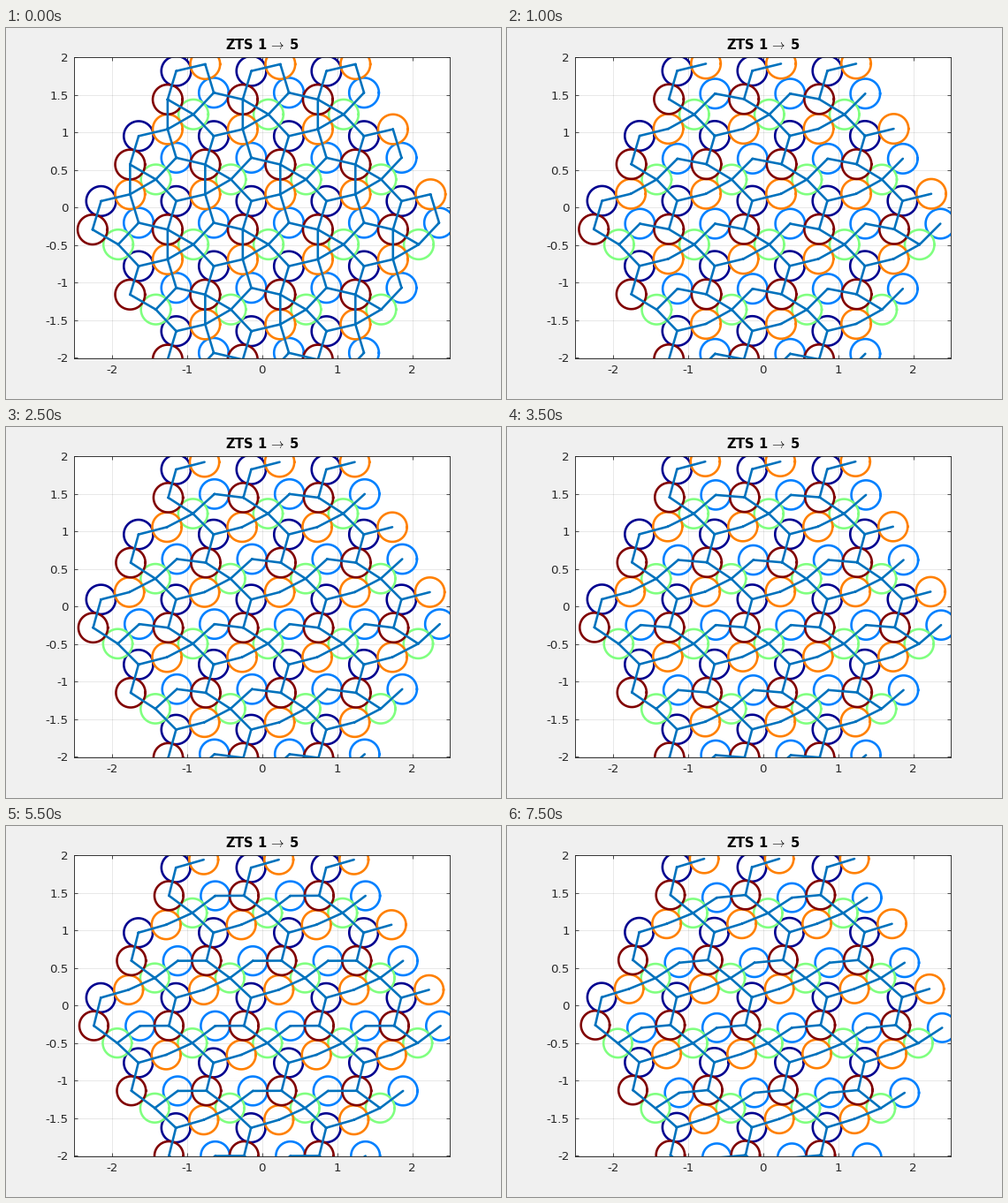
Recreate the animation shown at these times as a matplotlib script. Size 560 by 420 pixels, loop 8 s.

```python
import numpy as np
import matplotlib.pyplot as plt
from matplotlib.animation import FuncAnimation

FRAMES, INTERVAL = 16, 500
W, H, DPI = 560, 420, 100
LEFT, RIGHT, TOP, BOTTOM = 77.3, 502.2, 32.6, 373.55
SCALE = 85          # pixels per lattice constant
PT = 72 / DPI       # points per pixel
INK = (0.15, 0.15, 0.15)

plt.rcParams["font.family"] = "DejaVu Sans"
plt.rcParams["mathtext.fontset"] = "cm"
plt.rcParams["axes.unicode_minus"] = False

# Disc centres inside one cell, in pixels from the cell origin (y up)
NAVY, BLUE, GREEN, ORANGE, RED = range(5)
COLORS = [(0, 0, 0.5625), (0, 0.5, 1), (0.5, 1, 0.5), (1, 0.5, 0), (0.5, 0, 0)]
START = np.array([(-12.2, 7.13), (30.3, -17.42), (7.24, -41.95),
                  (20.58, 14.83), (-21.92, -25.1)]) / SCALE
END = np.array([(-12.7, 9.2), (32.6, -25.3), (5.6, -42.8),
                (18.3, 18.7), (-19.9, -22.3)]) / SCALE
DIAMETER = 0.3961, 0.3815

# Contacts: disc, disc, and the lattice step to the second disc's cell
LASTING = [
    (RED, NAVY, (0, 0)), (NAVY, ORANGE, (0, 0)),
    (RED, GREEN, (0, 0)), (GREEN, BLUE, (0, 0)),
    (BLUE, RED, (1, 0)), (GREEN, NAVY, (1, -1)), (GREEN, ORANGE, (0, -1)),
]
OPENING = [(BLUE, ORANGE, (0, 0)), (RED, ORANGE, (0, -1))]

# Hexagonal patch of 19 cells
CELLS = [(i, j) for j in range(-2, 3) for i in range(-2, 3) if abs(i + j) <= 2]
ANGLE = np.linspace(0, 2 * np.pi, 73)
RING = np.column_stack([np.cos(ANGLE), np.sin(ANGLE)])
GAP = np.full((1, 2), np.nan)


def origin(i, j):
    return np.array([i + j / 2, j * np.sqrt(3) / 2])


def rings(site, radius):
    parts = [np.vstack([origin(*c) + site + radius * RING, GAP]) for c in CELLS]
    return np.vstack(parts).T


def bonds(sites, contacts):
    parts = []
    for i, j in CELLS:
        for a, b, (di, dj) in contacts:
            other = (i + di, j + dj)
            if other in CELLS:
                parts.append(np.vstack([origin(i, j) + sites[a],
                                        origin(*other) + sites[b], GAP]))
    return np.vstack(parts).T


fig = plt.figure(figsize=(W / DPI, H / DPI), dpi=DPI, facecolor="#f0f0f0")
ax = fig.add_axes([LEFT / W, 1 - BOTTOM / H, (RIGHT - LEFT) / W, (BOTTOM - TOP) / H])
yticks = np.arange(-2, 2.1, 0.5)
ax.set(xlim=(-2.5, 2.5), ylim=(-2.005, 2.005), xticks=range(-2, 3), yticks=yticks)
ax.set_yticklabels([f"{v:g}" for v in yticks])
ax.set_axisbelow(True)
ax.grid(color=INK, alpha=0.15, lw=0.7 * PT)
ax.tick_params(direction="in", top=True, right=True, length=4.25 * PT,
               width=0.8 * PT, color=INK, labelcolor=INK,
               labelsize=13.33 * PT, pad=6.5 * PT)
ax.tick_params(axis="x", pad=7.2 * PT)
for spine in ax.spines.values():
    spine.set(color=INK, lw=0.9 * PT)
fig.text((LEFT + RIGHT) / 2 / W, 1 - 24.4 / H, r"ZTS 1 $\!\rightarrow\!$ 5",
         ha="center", va="baseline", size=14.67 * PT, weight="bold")

LINE = 2.6 * PT
discs = [ax.plot([], [], color=c, lw=LINE, zorder=2)[0] for c in COLORS]
net, = ax.plot([], [], color=(0, 0.447, 0.741), lw=LINE,
               solid_capstyle="round", zorder=2.2)


def draw(frame):
    t = frame / (FRAMES - 1)
    sites = START + (END - START) * t
    radius = (DIAMETER[0] + (DIAMETER[1] - DIAMETER[0]) * t) / 2
    for line, site in zip(discs, sites):
        line.set_data(*rings(site, radius))
    # opening contacts only touch before the motion begins
    net.set_data(*bonds(sites, LASTING if frame else LASTING + OPENING))
    return [*discs, net]


anim = FuncAnimation(fig, draw, frames=FRAMES, interval=INTERVAL,
                     repeat=True, repeat_delay=0, blit=False)
plt.show()
```
